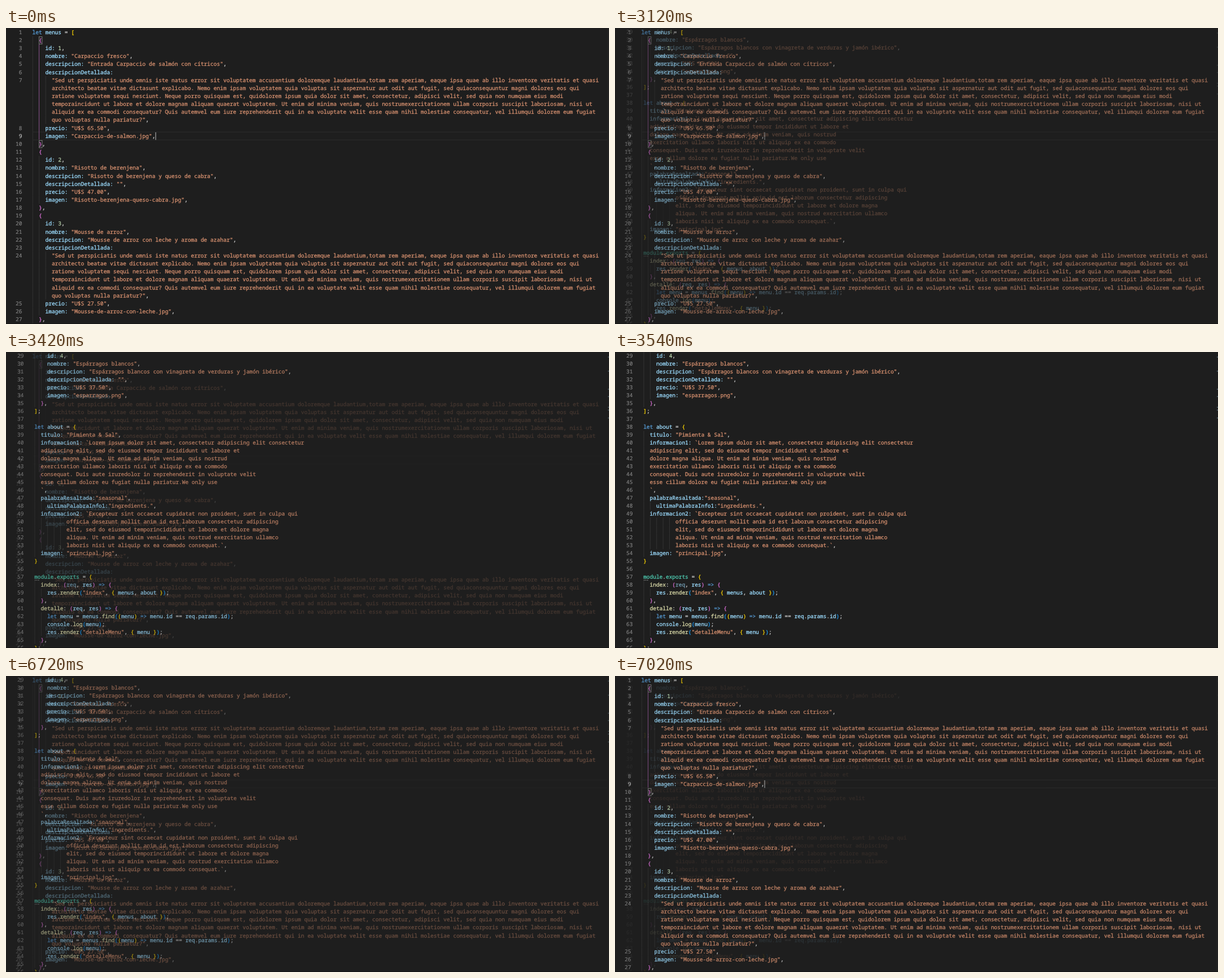
An HTML page for the animation above (7.08 s loop, 1067 by 525 pixels).

```html
<!DOCTYPE html>
<html lang="es">
<head>
<meta charset="utf-8">
<title>Menus</title>
<style>
  html, body { margin: 0; width: 100%; height: 100%; overflow: hidden; background: #1e1e1e; }
  svg { display: block; width: 1067px; height: 525px; }
  text { font-family: "Noto Sans Mono", "DejaVu Sans Mono", monospace; white-space: pre; text-rendering: geometricPrecision; }
</style>
</head>
<body>
<svg id="stage" viewBox="0 0 1067 525"></svg>

<script type="text/plain" id="menus">
let menus = [
  {
    id: 1,
    nombre: "Carpaccio fresco",
    descripcion: "Entrada Carpaccio de salmón con cítricos",
    descripcionDetallada:
@lorem
    precio: "U$S 65.50",
    imagen: "Carpaccio-de-salmon.jpg",
  },
  {
    id: 2,
    nombre: "Risotto de berenjena",
    descripcion: "Risotto de berenjena y queso de cabra",
    descripcionDetallada: "",
    precio: "U$S 47.00",
    imagen: "Risotto-berenjena-queso-cabra.jpg",
  },
  {
    id: 3,
    nombre: "Mousse de arroz",
    descripcion: "Mousse de arroz con leche y aroma de azahar",
    descripcionDetallada:
@lorem
    precio: "U$S 27.50",
    imagen: "Mousse-de-arroz-con-leche.jpg",
  },
</script>

<script type="text/plain" id="lorem">
      "Sed ut perspiciatis unde omnis iste natus error sit voluptatem accusantium doloremque laudantium,totam rem aperiam, eaque ipsa quae ab illo inventore veritatis et quasi
      architecto beatae vitae dictasunt explicabo. Nemo enim ipsam voluptatem quia voluptas sit aspernatur aut odit aut fugit, sed quiaconsequuntur magni dolores eos qui
      ratione voluptatem sequi nesciunt. Neque porro quisquam est, quidolorem ipsum quia dolor sit amet, consectetur, adipisci velit, sed quia non numquam eius modi
      temporaincidunt ut labore et dolore magnam aliquam quaerat voluptatem. Ut enim ad minima veniam, quis nostrumexercitationem ullam corporis suscipit laboriosam, nisi ut
      aliquid ex ea commodi consequatur? Quis autemvel eum iure reprehenderit qui in ea voluptate velit esse quam nihil molestiae consequatur, vel illumqui dolorem eum fugiat
      quo voluptas nulla pariatur?",
</script>

<script type="text/plain" id="about">
    id: 4,
    nombre: "Espárragos blancos",
    descripcion: "Espárragos blancos con vinagreta de verduras y jamón ibérico",
    descripcionDetallada: "",
    precio: "U$S 37.50",
    imagen: "esparragos.png",
  },
];

let about = {
  titulo: "Pimienta & Sal",
  informacion1: `Lorem ipsum dolor sit amet, consectetur adipiscing elit consectetur
  adipiscing elit, sed do eiusmod tempor incididunt ut labore et
  dolore magna aliqua. Ut enim ad minim veniam, quis nostrud
  exercitation ullamco laboris nisi ut aliquip ex ea commodo
  consequat. Duis aute iruredolor in reprehenderit in voluptate velit
  esse cillum dolore eu fugiat nulla pariatur.We only use
  `,
  palabraResaltada:"seasonal",
    ultimaPalabraInfo1:"ingredients.",
  informacion2: `Excepteur sint occaecat cupidatat non proident, sunt in culpa qui
          officia deserunt mollit anim id est laborum consectetur adipiscing
          elit, sed do eiusmod temporincididunt ut labore et dolore magna
          aliqua. Ut enim ad minim veniam, quis nostrud exercitation ullamco
          laboris nisi ut aliquip ex ea commodo consequat.`,
  imagen: "principal.jpg",
}

module.exports = {
  index: (req, res) => {
    res.render("index", { menus, about });
  },
  detalle: (req, res) => {
    let menu = menus.find((menu) => menu.id == req.params.id);
    console.log(menu);
    res.render("detalleMenu", { menu });
  },
};
</script>

<script>
const stage = document.getElementById("stage");
const BRACKETS = ["#ffd700", "#da70d6", "#179fff"];
const STRING = "#d6906f";

// Token patterns, tried in order at the current position.
const RULES = [
  [/^(let\b|=>)/, "#569cd6"],
  [/^(module|exports)\b/, "#4ec9b0"],
  [/^\w+(?=: \()/, "#dcdcaa"],
  [/^\w+:/, "#9cdcfe"],
  [/^\d+/, "#b5cea8"],
  [/^\w+(?=\()/, "#dcdcaa"],
  [/^\w+/, "#9cdcfe"],
  [/^[^\w"`()[\]{}]/, "#d4d4d4"],
];

function add(parent, tag, attrs, content = "") {
  const el = document.createElementNS("http://www.w3.org/2000/svg", tag);
  for (const key in attrs) el.setAttribute(key, attrs[key]);
  el.textContent = content;
  return parent.appendChild(el);
}

const rect = (parent, x, y, width, height, fill) =>
  add(parent, "rect", { x, y, width, height, fill });

const source = id => document.getElementById(id).textContent.replace(/^\n|\n$/g, "");

// Yields [text, colour] pairs; state carries open quotes and bracket depth between rows.
function* tokens(row, state) {
  let rest = row;
  while (rest) {
    let text, fill;
    if (state.quote || /^["`]/.test(rest)) {
      const from = state.quote ? 0 : 1;
      state.quote = state.quote || rest[0];
      const end = rest.indexOf(state.quote, from);
      text = end < 0 ? rest : rest.slice(0, end + 1);
      if (end >= 0) state.quote = "";
      fill = STRING;
    } else if (/^[([{]/.test(rest)) {
      text = rest[0];
      fill = BRACKETS[state.depth++ % 3];
    } else if (/^[)\]}]/.test(rest)) {
      text = rest[0];
      fill = BRACKETS[--state.depth % 3];
    } else {
      const rule = RULES.find(([pattern]) => pattern.test(rest));
      text = rest.match(rule[0])[0];
      fill = rule[1];
    }
    yield [text, fill];
    rest = rest.slice(text.length);
  }
}

function drawEditor(code, o) {
  const page = add(stage, "g", { "font-size": o.advance / 0.6 });
  rect(page, 0, 0, 1067, 525, "#1e1e1e");
  const guides = add(page, "g", {});
  const state = { quote: "", depth: o.depth };
  let number = o.first;

  code.split("\n").forEach((row, i) => {
    const y = o.baseline + i * o.pitch;
    const body = row.trimStart();
    const indent = row.length - body.length;
    for (let col = 0; col < indent; col += 2)
      rect(guides, o.left + col * o.advance + 0.3, y - o.pitch * 0.74, 0.9, o.pitch, "#363636");

    if (state.quote !== '"') {
      const fill = number === o.active ? "#c6c6c6" : "#858585";
      add(page, "text", {
        x: o.gutter, y, "text-anchor": "end", fill, stroke: fill, "stroke-width": 0.15,
      }, number++);
    }
    // A hairline outline gives the small glyphs their full colour.
    const line = add(page, "text", { x: o.left + indent * o.advance, y, "stroke-width": 0.3 });
    for (const [text, fill] of tokens(body, state)) {
      const unused = body.startsWith("index") && text === "req";
      add(line, "tspan", { fill, stroke: fill, opacity: unused ? 0.65 : 1 }, text);
    }
  });
  return page;
}

const menuCode = source("menus").replace(/@lorem/g, () => source("lorem"));
const first = drawEditor(menuCode, {
  left: 46.5, advance: 5.731, baseline: 10.8, pitch: 14.15,
  gutter: 28.4, first: 1, active: 9, depth: 0,
});
rect(first, 47, 184, 1017, 1, "#2b2b2b");
rect(first, 47, 198, 1017, 1, "#2b2b2b");
rect(first, 58, 29, 1, 169, "#87508a");
rect(first, 264.4, 185, 1, 13.5, "#c4c4c4");
for (const y of [15.5, 199.5])
  add(first, "rect", { x: 58.5, y, width: 5.5, height: 13, fill: "none", stroke: "#808080", "stroke-width": 0.9 });
rect(first, 1065, 0, 1, 525, "#262626");

const second = drawEditor(source("about"), {
  left: 50.2, advance: 5.683, baseline: 10.4, pitch: 13.99,
  gutter: 31.4, first: 29, active: 0, depth: 2,
});
for (const x of [51, 54, 57]) rect(second, x, 404, 1.3, 1.3, "#a0a0a0");
for (const y of [8, 33, 65, 78, 97, 102, 116]) rect(second, 1065, y, 2, 2, "#45535c");

rect(stage, 0, 524, 1067, 1, "#151515");

const HOLD = 3000, STEP = 60, FADE = 9 * STEP, LOOP = 2 * (HOLD + FADE);

function mixAt(time) {
  const half = HOLD + FADE;
  const t = time % LOOP;
  const local = t % half;
  const mix = local < HOLD ? 0 : (Math.floor((local - HOLD) / STEP) + 1) / 10;
  return t < half ? mix : 1 - mix;
}

const start = performance.now();
function draw() {
  second.setAttribute("opacity", mixAt(performance.now() - start));
  requestAnimationFrame(draw);
}
draw();
</script>
</body>
</html>
```
